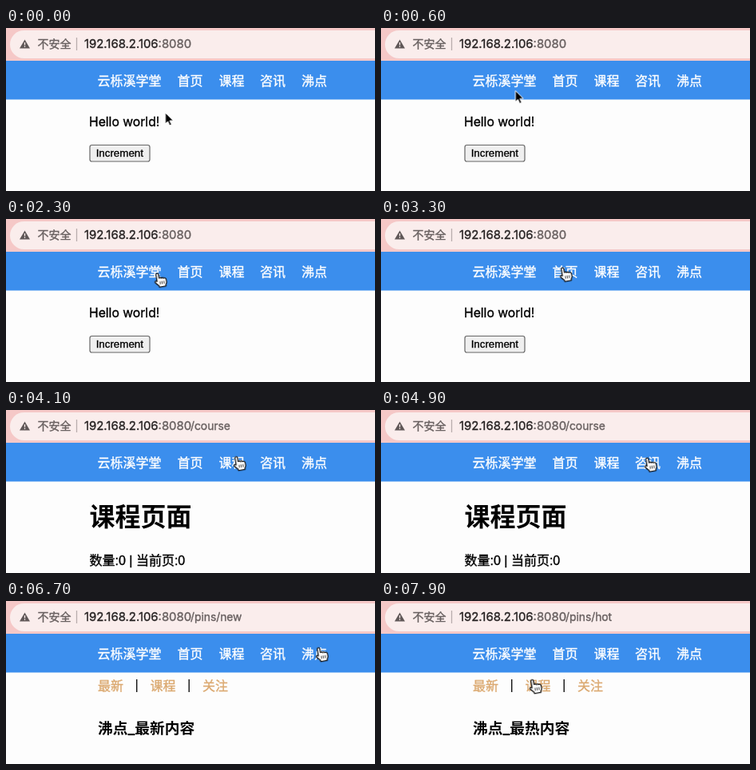
Write an HTML page that moves like this. It is 462 px wide and 204 px high and loops after 8 s.

```html
<!DOCTYPE html>
<html lang="zh-CN">
<head>
<meta charset="utf-8">
<title>Router demo</title>
<style>
  html, body { margin: 0; width: 100%; height: 100%; overflow: hidden; background: #fdfdfd; }
  svg { display: block; width: 100%; height: 100%; }
  text {
    font: 16px "Liberation Sans", "Noto Sans CJK SC", "Noto Sans CJK", sans-serif;
    white-space: pre;
    color: #000;
  }
  text, tspan { fill: currentColor; stroke: currentColor; stroke-width: .35px; }
  .bar text { font-family: Inter, "Noto Sans CJK SC", sans-serif; font-size: 14px; color: #675f5f; }
  .bar .url { font-size: 14.9px; }
  .bar .path { font-size: 13.8px; }
  .host { color: #262222; }
  .nav text { color: #fff; }
  .tabs text { color: #dba970; }
  .hello { font: 15.7px Inter, sans-serif; }
  .title { font-size: 32px; font-weight: 700; }
  .subtitle { font-family: Inter, "Noto Sans CJK SC", sans-serif; font-size: 18.72px; font-weight: 700; }
  .title, .subtitle { stroke: none; }
  .button { font-size: 13.33px; text-anchor: middle; }

  .home, .course, .news, .pins, .new, .hot, .arrow, .hand {
    animation: 8s step-end infinite;
    visibility: hidden;
  }
  .home { animation-name: home; }
  .course { animation-name: course; }
  .news { animation-name: news; }
  .pins { animation-name: pins; }
  .new { animation-name: new; }
  .hot { animation-name: hot; }
  .arrow { animation-name: arrow; }
  .hand { animation-name: hand; }
  @keyframes home { 0% { visibility: visible } 48.7%, 100% { visibility: hidden } }
  @keyframes course { 0% { visibility: hidden } 48.7% { visibility: visible } 62.4%, 100% { visibility: hidden } }
  @keyframes news { 0% { visibility: hidden } 62.4% { visibility: visible } 78.7%, 100% { visibility: hidden } }
  @keyframes pins { 0% { visibility: hidden } 78.7%, 100% { visibility: visible } }
  @keyframes new { 0% { visibility: hidden } 78.7% { visibility: visible } 98.7%, 100% { visibility: hidden } }
  @keyframes hot { 0% { visibility: hidden } 98.7%, 100% { visibility: visible } }
  @keyframes arrow { 0% { visibility: visible } 21.2%, 100% { visibility: hidden } }
  @keyframes hand { 0% { visibility: hidden } 21.2%, 100% { visibility: visible } }

  .cursor { animation: move 8s ease-in-out infinite; }
  @keyframes move {
    0%, 1.2% { transform: translate(199.5px, 106px) }
    12.5%, 17.5% { transform: translate(147.5px, 60px) }
    26.2%, 33.7% { transform: translate(191px, 68px) }
    39%, 42% { transform: translate(229px, 61px) }
    47.5%, 54% { transform: translate(290px, 58.5px) }
    59.5%, 63.7% { transform: translate(335px, 60px) }
    67.5%, 72.5% { transform: translate(366px, 59px) }
    77%, 87.5% { transform: translate(393px, 58.5px) }
    97.5%, 100% { transform: translate(191px, 98.5px) }
  }
</style>
</head>
<body>
<svg viewBox="0 0 462 204" preserveAspectRatio="none">
  <rect width="462" height="204" fill="#fdfdfd"/>

  <g class="bar">
    <rect width="462" height="42" fill="#f5c8c7"/>
    <rect x="5" y="3" width="490" height="35" rx="17.5" fill="#faedec"/>
    <path d="M23.5 14.5 30 25.5H17Z" fill="#5f5757"/>
    <path d="M23.5 18v3.6m0 1v1.4" stroke="#faedec" stroke-width="1.3"/>
    <text x="39.5" y="25">不安全</text>
    <path d="M88.5 12v16" stroke="#b9adad" stroke-width="1.3"/>
    <text class="url" x="98" y="25"><tspan class="host">192.168.2.106</tspan>:8080</text>
    <text class="path course" x="231" y="25">/course</text>
    <text class="path news" x="231" y="25">/news</text>
    <text class="path new" x="231" y="25">/pins/new</text>
    <text class="path hot" x="231" y="25">/pins/hot</text>
  </g>

  <g class="nav">
    <rect y="41" width="462" height="48.5" fill="#3b8eed"/>
    <text x="114.5" y="72">云栎溪学堂</text>
    <text x="214.5" y="72">首页</text>
    <text x="266.5" y="72">课程</text>
    <text x="318" y="72">咨讯</text>
    <text x="370" y="72">沸点</text>
  </g>

  <g class="home">
    <text class="hello" x="104" y="123">Hello world!</text>
    <rect x="105" y="146.5" width="75" height="20.5" rx="2.5" fill="#efefef" stroke="#666" stroke-width="1.2"/>
    <text class="button" x="142.3" y="161">Increment</text>
  </g>

  <g class="course">
    <text class="title" x="104.5" y="145">课程页面</text>
    <text x="104.5" y="194">数量:0 | 当前页:0</text>
  </g>

  <text class="title news" x="104.5" y="145">新闻页面</text>

  <g class="pins">
    <g class="tabs">
      <text x="115" y="112">最新</text>
      <text x="180.5" y="112">课程</text>
      <text x="246" y="112">关注</text>
    </g>
    <path d="M163.7 98v16m65.5-16v16" stroke="#111" stroke-width="1.4"/>
  </g>
  <text class="subtitle new" x="115" y="166">沸点_最新内容</text>
  <text class="subtitle hot" x="115" y="166">沸点_最热内容</text>

  <g class="cursor" stroke-linejoin="round">
    <path class="arrow" d="M0 0V14L3.2 11 5.4 16 7.8 15 5.6 10H10Z" fill="#000" stroke="#fff"/>
    <g class="hand" fill="#fff" stroke="#111" stroke-width="1.2" transform="translate(-2) rotate(-10) scale(1.06)">
      <path d="M-1.5 9.5V1.5Q-1.5 0 0 0T1.5 1.5V6Q2.8 5 4 6.4 5.5 5.5 6.6 7 8.8 6.4 9.5 8.3V12Q9 14 8 15V16.5H0V15L-4 10.6Q-4.2 8.6-2.8 8.8Z"/>
      <path d="M1.8 10v3.5M4.1 10v3.5M6.4 10v3.5" stroke-width=".8"/>
    </g>
  </g>
</svg>
</body>
</html>
```
